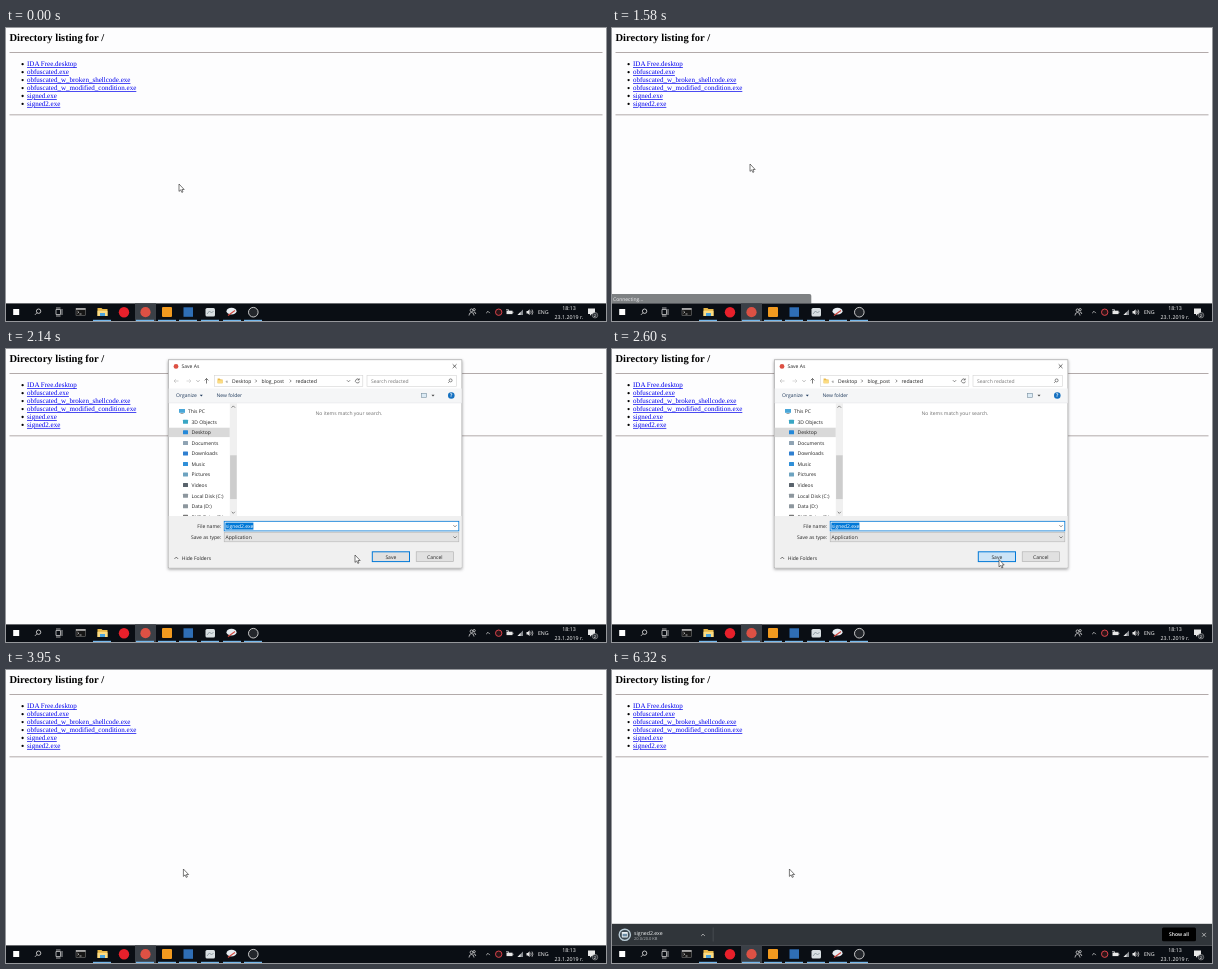
An HTML page that plays this animation: 600x293 px, repeating every 8 s.

```html
<!DOCTYPE html>
<html lang="en">
<head>
<meta charset="utf-8">
<title>Saving a file</title>
<style>
  html, body { margin: 0; width: 100%; height: 100%; overflow: hidden; background: #fdfdfe; }
  svg { display: block; width: 600px; height: 293px; }
  text { font-family: "Open Sans", "Noto Sans", sans-serif; font-size: 5px; text-rendering: geometricPrecision; }
  .page text { font-family: "Liberation Serif", serif; font-size: 7.03px; fill: #0000ee; text-decoration: underline; }
  .page .head { font-size: 10.54px; font-weight: bold; fill: #000; text-decoration: none; }
  .tray text { font-size: 5.3px; }
  .line { fill: none; stroke-width: .7; }
</style>
</head>
<body>
<svg id="stage" viewBox="0 0 600 293"></svg>
<script>
const STEP = 112.86, LOOP = 8000;

const text = (x, y, s, fill = '#222', more = '') => `<text x="${x}" y="${y}" fill="${fill}" ${more}>${s}</text>`;
const rect = (x, y, w, h, fill, more = '') => `<rect x="${x}" y="${y}" width="${w}" height="${h}" fill="${fill}" ${more}/>`;
const disc = (x, y, r, fill, more = '') => `<circle cx="${x}" cy="${y}" r="${r}" fill="${fill}" ${more}/>`;
const line = (d, color = '#555', more = '') => `<path class="line" d="${d}" stroke="${color}" ${more}/>`;
const shape = (d, fill) => `<path d="${d}" fill="${fill}"/>`;
const down = (x, y, color) => line(`M${x - 1.6} ${y - .8}l1.6 1.6 1.6 -1.6`, color);
const up = (x, y, color) => line(`M${x - 1.8} ${y + .9}l1.8 -1.8 1.8 1.8`, color);
const right = (x, y) => line(`M${x - .7} ${y - 1.4}l1.4 1.4 -1.4 1.4`);
const cross = (x, y, r, color) => line(`M${x - r} ${y - r}l${2 * r} ${2 * r}m0 ${-2 * r}l${-2 * r} ${2 * r}`, color);
const lens = (x, y, r, color) =>
  disc(x, y, r, 'none', `stroke="${color}" stroke-width=".8"`) +
  line(`M${x - r * .7} ${y + r * .7}l${-r} ${r}`, color);
const folder = (x, y, w, h) =>
  shape(`M${x} ${y}h${w * .4}l1 1h${w * .6 - 1}v${h - 1}h${-w}z`, '#e9b94a') + rect(x, y + h * .35, w, h * .65, '#fbdc83');

function page() {
  const files = ['IDA Free.desktop', 'obfuscated.exe', 'obfuscated_w_broken_shellcode.exe',
    'obfuscated_w_modified_condition.exe', 'signed.exe', 'signed2.exe'];
  return '<g class="page">' + text(3.5, 13, 'Directory listing for /', '', 'class="head"') +
    [24, 86.4].map(y => rect(3.5, y, 593, .9, '#aaa1a1')).join('') +
    files.map((name, i) => disc(16.6, 36.2 + i * 7.95, 1.15, '#000') + text(21, 38.2 + i * 7.95, name)).join('') + '</g>';
}

function taskbar() {
  const W = '#e8e8e8';
  const mid = 'text-anchor="middle"';
  return '<g class="tray">' + rect(0, 275.4, 600, 17.6, '#0a0e14') +
    rect(129, 275.4, 21, 17.6, '#3b4047') +
    [96, 139, 161, 182, 204, 226, 247].map(x => rect(x - 9, 291.8, 18, 1.2, '#76b9ed')).join('') +
    rect(7.2, 281, 6, 6, '#fff') +
    lens(32.6, 283.2, 2.2, W) +
    line('M50 281.5h4.5v5h-4.5zM56 281v6M50 280h4.5M50 288h4.5', W) +
    rect(70, 280.5, 9.5, 7, '#161616', 'stroke="#888" stroke-width=".5"') + rect(70, 280.3, 9.5, 1.4, '#ccc') +
    line('M71.5 283.2l1.3 1 -1.3 1M73.5 286h2', '#eee') +
    folder(91.5, 280, 10, 8) + rect(94, 285, 5, 3, '#4ba3dc') +
    disc(118, 284.2, 5.2, '#e8202b') +
    disc(139.5, 284.2, 5.1, '#dd5144') +
    rect(156, 279, 10, 10, '#f29a1f', 'rx="1"') +
    rect(177.5, 279.3, 9.5, 9.5, '#2f6eb5') +
    rect(199.5, 280, 9.5, 8.5, '#d9dfe2', 'rx="1.5"') + line('M201 286l2.5 -3 2 2 2 -2', '#77868d') +
    '<ellipse cx="225.5" cy="283.2" rx="5" ry="3.4" fill="#e8edf2"/>' +
    line('M222 287.5l7 -5', '#d1483e', 'style="stroke-width:1.2"') +
    disc(247.3, 284.2, 4.8, '#23262b', 'stroke="#d8d8d8" stroke-width=".9"') +
    disc(465.5, 282.3, 1.4, 'none', `stroke="${W}" stroke-width=".7"`) +
    disc(468.2, 281.6, 1.1, 'none', `stroke="${W}" stroke-width=".7"`) +
    line('M463 287.5q0 -3 2.5 -3t2.5 3M467.5 284q2 -.6 2.3 2', W) +
    up(482, 284.2, W) +
    disc(492.7, 284.2, 3.2, '#2b1518', 'stroke="#d9434b" stroke-width="1"') +
    rect(500.5, 282.7, 6, 3.4, W) + rect(506.5, 283.7, .8, 1.4, W) + line('M500 281.7h2.5v3', W) +
    shape('M511.5 287l5.5 -5.5v5.5z', '#8b8f94') + shape('M511.5 287l3 -3v3z', W) +
    shape('M520.5 283h1.3l1.8 -1.7v5.8l-1.8 -1.7h-1.3z', W) +
    line('M524.7 282.7q1 1.5 0 3M526 281.6q1.8 2.6 0 5.2', W) +
    text(537.3, 286.4, 'ENG', '#fff', mid) +
    text(563, 282.3, '18:13', '#fff', mid) + text(563, 291.1, '23.1.2019 г.', '#fff', mid) +
    shape('M582 280.5h7v5.5h-3.2l-1.8 1.8v-1.8h-2z', W) +
    disc(589, 287.2, 2.8, '#30343a', 'stroke="#ccc" stroke-width=".4"') +
    text(589, 288.7, '2', '#fff', mid + ' style="font-size:4px"') + '</g>';
}

function dialog() {
  const places = [['3D Objects', '#3aa6c4'], ['Desktop', '#2488d8'], ['Documents', '#8fa3b3'], ['Downloads', '#2f7fd0'],
    ['Music', '#2f8fd8'], ['Pictures', '#6da3c0'], ['Videos', '#59636c'], ['Local Disk (C:)', '#8d979e'],
    ['Data (D:)', '#8d979e'], ['DVD Drive (E:)', '#777']];
  const tree = places.map(([name, color], i) => {
    const y = 72.8 + i * 10.55;
    return rect(177, y - 2, 5, 4, color, 'rx=".5"') + text(185.5, y + 1.9, name);
  }).join('');
  const field = (x, y, w, h, fill, stroke, more = '') => rect(x, y, w, h, fill, `stroke="${stroke}" ${more}`);
  return rect(162.3, 10.8, 293.6, 208.1, '#fff', 'stroke="#9a9a9a" stroke-width=".6" filter="url(#shadow)"') +
    disc(170, 17.4, 2.4, '#dd5144') + text(175.6, 19.4, 'Save As') + cross(448.6, 17.2, 1.9, '#333') +
    line('M172.5 32h-4.5m1.8 -1.8l-1.8 1.8 1.8 1.8', '#bbb') +
    line('M180.5 32h4.5m-1.8 -1.8l1.8 1.8 -1.8 1.8', '#ccc') + down(192, 32, '#999') +
    line('M200.5 34.5v-5m-1.9 1.9l1.9 -1.9 1.9 1.9', '#444') +
    field(208.4, 26.3, 148.4, 11.2, '#fff', '#d4d4d4', 'stroke-width=".6"') + folder(211.6, 29.6, 5, 4.6) +
    text(219.5, 33.7, '«', '#555') + text(226, 33.8, 'Desktop') + right(250, 32) + text(255.5, 33.8, 'blog_post') +
    right(284.5, 32) + text(289.5, 33.8, 'redacted', '#222', 'style="font-size:5.2px"') + down(342.5, 32) +
    line('M353 30.7a2 2 0 1 0 .4 1.8M353.2 29.4v1.6h-1.6', '#555') +
    field(361, 26.3, 89.6, 11.2, '#fff', '#d4d4d4', 'stroke-width=".6"') +
    text(365, 33.8, 'Search redacted', '#777') + lens(444.6, 31.4, 1.5, '#666') +
    rect(162.7, 39.5, 293, 14.5, '#f5f6f7') + rect(162.7, 53.7, 293, .5, '#e0e2e5') +
    text(170, 48.3, 'Organize', '#1e395b') + shape('M193.8 45.8h3l-1.5 1.7z', '#1e395b') + text(210.5, 48.3, 'New folder', '#1e395b') +
    field(415.5, 44.3, 5, 4, '#dcebf5', '#7890a0', 'stroke-width=".6"') + shape('M425.5 45.8h3l-1.5 1.7z', '#444') +
    disc(445.3, 46.5, 3.3, '#1470c0') + text(445.3, 48.4, '?', '#fff', 'text-anchor="middle" font-weight="bold"') +
    '<g clip-path="url(#tree)">' + rect(162.7, 78.7, 66, 9.4, '#d9d9d9') +
    rect(173, 60, 6, 3.8, '#4aa7d8') + rect(174.5, 64.2, 3, .6, '#666') + text(182, 63.9, 'This PC') + tree + '</g>' +
    rect(223.8, 54.2, 7.2, 112.8, '#f0f0f0') + rect(224.1, 106.3, 6.6, 43.8, '#cdcdcd') +
    up(227.3, 57.8, '#555') + down(227.3, 163.6, '#555') +
    text(343, 65.6, 'No items match your search.', '#6d6d6d', 'text-anchor="middle"') +
    rect(162.7, 167, 293, 51.6, '#f0f0f0') +
    text(215.2, 178.8, 'File name:', '#222', 'text-anchor="end"') +
    field(218.2, 172.3, 234.6, 9.6, '#fff', '#0078d7', 'stroke-width=".8"') +
    rect(219.4, 173.6, 28, 7, '#0078d7') + text(219.8, 178.7, 'signed2.exe', '#fff') + down(449, 177) +
    text(215.2, 190, 'Save as type:', '#222', 'text-anchor="end"') +
    field(218.2, 183.6, 234.6, 9.2, '#e3e3e3', '#b5b5b5', 'stroke-width=".6"') +
    text(219.6, 189.9, 'Application') + down(449, 188.2) +
    up(170.3, 209, '#333') + text(175.8, 210.9, 'Hide Folders') +
    field(366.3, 202.8, 37.2, 9.8, '#e1e1e1', '#0078d7', 'stroke-width="1" id="save"') +
    text(384.8, 209.5, 'Save', '#222', 'text-anchor="middle"') +
    field(410.2, 202.8, 37.2, 9.8, '#e1e1e1', '#adadad', 'stroke-width=".6"') +
    text(428.8, 209.5, 'Cancel', '#222', 'text-anchor="middle"');
}

function shelf() {
  return rect(0, 253.8, 600, 21.6, '#30353a') +
    disc(12.8, 264.8, 5.6, '#3d4850', 'stroke="#b9cbd6" stroke-width="1" id="ring"') +
    rect(9.8, 262, 6, 5.4, '#e9eff3', 'rx=".6"') + rect(10.6, 263.8, 4.4, 2.6, '#6c8ca4') +
    '<g clip-path="url(#item)"><g id="label">' +
    text(22, 265, 'signed2.exe', '#f1f3f4', 'style="font-size:5.2px"') +
    text(22, 270.4, '20.0/20.0 KB', '#b4b8bc', 'style="font-size:4px"') + '</g></g>' +
    '<g id="menu">' + up(91, 265, '#ddd') + '</g>' +
    rect(0, 257.5, .6, 14, '#565b60', 'id="split"') +
    rect(550, 257.5, 34, 13.8, '#000', 'rx="1.5"') +
    text(567, 266.3, 'Show all', '#fff', 'text-anchor="middle" font-weight="600"') +
    cross(592, 264.8, 1.9, '#ddd');
}

const $ = id => document.getElementById(id);
$('stage').innerHTML = `<defs>
  <filter id="shadow" x="-5%" y="-5%" width="110%" height="112%"><feDropShadow dx="0" dy="1.2" stdDeviation="1.8" flood-opacity=".4"/></filter>
  <clipPath id="tree"><rect x="162" y="54" width="61.8" height="113"/></clipPath>
  <clipPath id="item"><rect id="itemBox" x="18" y="254" width="80" height="21"/></clipPath></defs>` +
  rect(0, 0, 600, 293, '#fdfdfe') + page() +
  '<g id="status">' + shape('M0 266h197.5q1.8 0 1.8 1.8v7.6h-199.3z', '#323639') + text(1, 273, 'Connecting...', '#e8eaed') + '</g>' +
  '<g id="arrow">' + shape('M-2 -8h4v5h3.6l-5.6 5.6 -5.6 -5.6h3.6z', '#4285f4') + rect(-6.8, 5.6, 13.6, 1.9, '#4285f4') + '</g>' +
  '<g id="shelf">' + shelf() + '</g>' + taskbar() + '<g id="dialog">' + dialog() + '</g>' +
  '<g id="cursor" stroke="#222" stroke-width=".6" stroke-linejoin="round">' +
  '<path id="pointer" fill="#fff" d="M0 0V7.4L1.7 5.9 2.8 8.4 4 7.9 2.9 5.5H5.2z"/>' +
  '<path id="hand" fill="#fff" d="M-.8 4.6V.6q.7 -1 1.4 0V3.3l3 .6q.9 .3 .8 1.3l-.6 3.2h-3.8l-2.5 -3q0 -1 1.7 -.8z"/></g>';

// [step, x, y]
const path = [[0, 173, 156], [1, 152, 143], [2, 103, 110], [3, 57, 85], [4, 38, 77], [10, 38, 77], [11, 50, 84],
  [12, 79, 103], [13, 112, 122], [14, 138, 136], [15, 164, 148], [16, 203, 164], [17, 253, 183], [18, 305, 198],
  [19, 349, 206], [20, 373, 209], [22, 387, 210.5], [24, 387, 210.5], [25, 358, 212], [26, 293, 208], [27, 227, 203],
  [28, 188, 200], [29, 177.6, 199.3], [34, 177.6, 199.3], [35, 177.4, 199]];

function at(keys, k) {
  const i = keys.findIndex(p => p[0] > k);
  if (i < 0) return keys.at(-1).slice(1);
  const a = keys[i - 1], b = keys[i], u = (k - a[0]) / (b[0] - a[0]);
  return a.slice(1).map((v, j) => v + (b[j + 1] - v) * u);
}
const show = (id, alpha) => {
  $(id).style.display = alpha > 0 ? '' : 'none';
  $(id).setAttribute('opacity', alpha);
};
const move = (id, x, y, more = '') => $(id).setAttribute('transform', `translate(${x} ${y})${more}`);

function draw(t) {
  const k = Math.floor((t + 6) / STEP);
  move('cursor', ...at(path, k));
  const link = k >= 4 && k <= 10;
  show('hand', +link);
  show('pointer', +!link);

  show('status', at([[0, 0], [6, 0], [7, .4], [8, .8], [9, 1], [13, 1], [14, .62], [15, .25], [16, 0]], k)[0]);

  const [alpha, scale] = at([[0, 0, .9], [15, 0, .9], [16, .5, .96], [17, 1, 1], [23, 1, 1], [24, .26, .966], [25, 0, .9]], k);
  show('dialog', alpha);
  move('dialog', 309, 114.8, `scale(${scale}) translate(-309 -114.8)`);
  $('save').setAttribute('fill', k < 20 ? '#e1e1e1' : k < 23 ? '#e5f1fb' : '#cce4f7');

  show('shelf', +(k >= 51));
  const [width, shift] = at([[0, 14, -1.5], [51, 14, -1.5], [52, 43, -.8], [53, 65, -.3], [54, 77, 0], [55, 82.5, 0]], k);
  $('itemBox').setAttribute('width', width);
  move('label', shift, 0);
  $('split').setAttribute('x', 18.3 + width);
  show('menu', +(width > 75));
  $('ring').setAttribute('stroke-width', k < 54 ? 1 : 1.4);
  const [fade, drop] = at([[0, 0, 237], [50, 0, 237], [51, .55, 237], [52, .5, 241], [53, .3, 245], [54, .12, 248], [55, 0, 250]], k);
  show('arrow', fade);
  move('arrow', 16, drop);
}

const start = performance.now();
(function tick() {
  draw((performance.now() - start) % LOOP);
  requestAnimationFrame(tick);
})();
</script>
</body>
</html>
```
